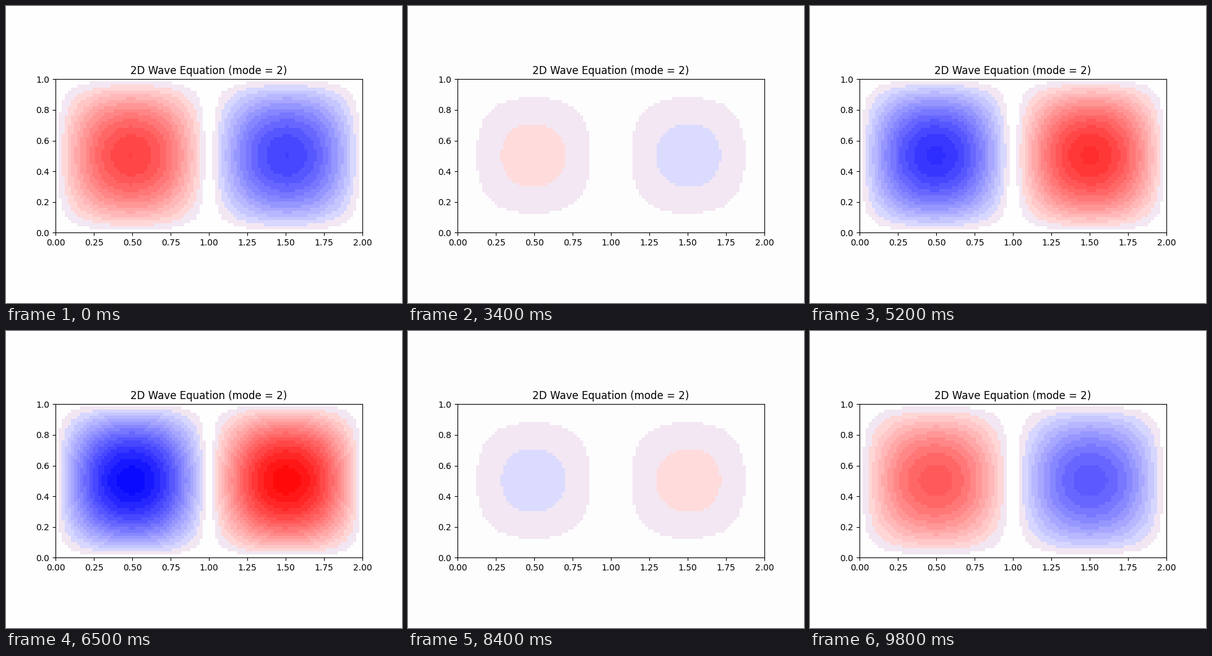
Write a matplotlib script that moves like this. It is 640 px wide and 480 px high and loops after 9.9 s.

```python
import numpy as np
import matplotlib.pyplot as plt
from matplotlib.animation import FuncAnimation
from matplotlib.patches import Rectangle

NX, NY = 100, 50
FRAMES, INTERVAL = 99, 100
PERIOD, PEAK = 100, 11.5      # in frames
CELL_AREA = 4.96 ** 2         # pixels per grid cell
MARGIN_AREA = 640 * 480 - 496 * 248

# Standing wave on the interior points of a membrane clamped at its edges
x = np.arange(1, NX + 1) / (NX + 1)
y = np.arange(1, NY + 1) / (NY + 1)
mode = np.outer(np.sin(np.pi * y), np.sin(2 * np.pi * x))
mode /= np.abs(mode).max()


def blue_white_red(values):
    """Map -1..1 to integer RGB in 256 steps."""
    step = np.clip(np.floor((values + 1) * 128), 0, 255).astype(int)
    fade = np.where(step < 128, 2 * step, 510 - 2 * step)
    red = np.where(step < 128, fade, 255)
    blue = np.where(step < 128, 255, fade)
    return np.stack([red, fade, blue], axis=-1)


def banded(values):
    """Group similar colours into bands, each drawn in its mean colour.

    The white margin counts towards the palest band, whose colour is
    returned as the background.
    """
    rgb = blue_white_red(values).reshape(-1, 3)
    rgb = np.vstack([rgb, [255, 255, 255]])
    weight = np.full(len(rgb), CELL_AREA)
    weight[-1] = MARGIN_AREA
    r, g, b = rgb.T
    key = (r >> 5) * 256 + (g >> 4) * 16 + (b >> 5)
    band = np.unique(key, return_inverse=True)[1].ravel()
    total = np.bincount(band, weight)
    means = [np.bincount(band, weight * c) / total for c in (r, g, b)]
    colours = np.floor(np.stack(means, axis=-1) + 1e-6).astype(np.uint8)
    cells = colours[band]
    return cells[:-1].reshape(values.shape + (3,)), cells[-1] / 255


def wave(frame):
    return mode * np.cos(2 * np.pi * (frame - PEAK) / PERIOD)


fig, ax = plt.subplots(figsize=(6.4, 4.8), dpi=100)
backdrop = fig.add_artist(Rectangle((0, 0), 1, 1, transform=fig.transFigure,
                                    lw=0, zorder=-1))
ax.patch.set_visible(False)
image = ax.imshow(banded(wave(0))[0], extent=[0, 2, 0, 1], origin="lower",
                  interpolation="nearest")
ax.set_title("2D Wave Equation (mode = 2)")


def update(frame):
    cells, background = banded(wave(frame))
    image.set_data(cells)
    backdrop.set_facecolor(background)
    return image, backdrop


anim = FuncAnimation(fig, update, frames=FRAMES, interval=INTERVAL,
                     repeat=True, repeat_delay=0, blit=False)
plt.show()
```
